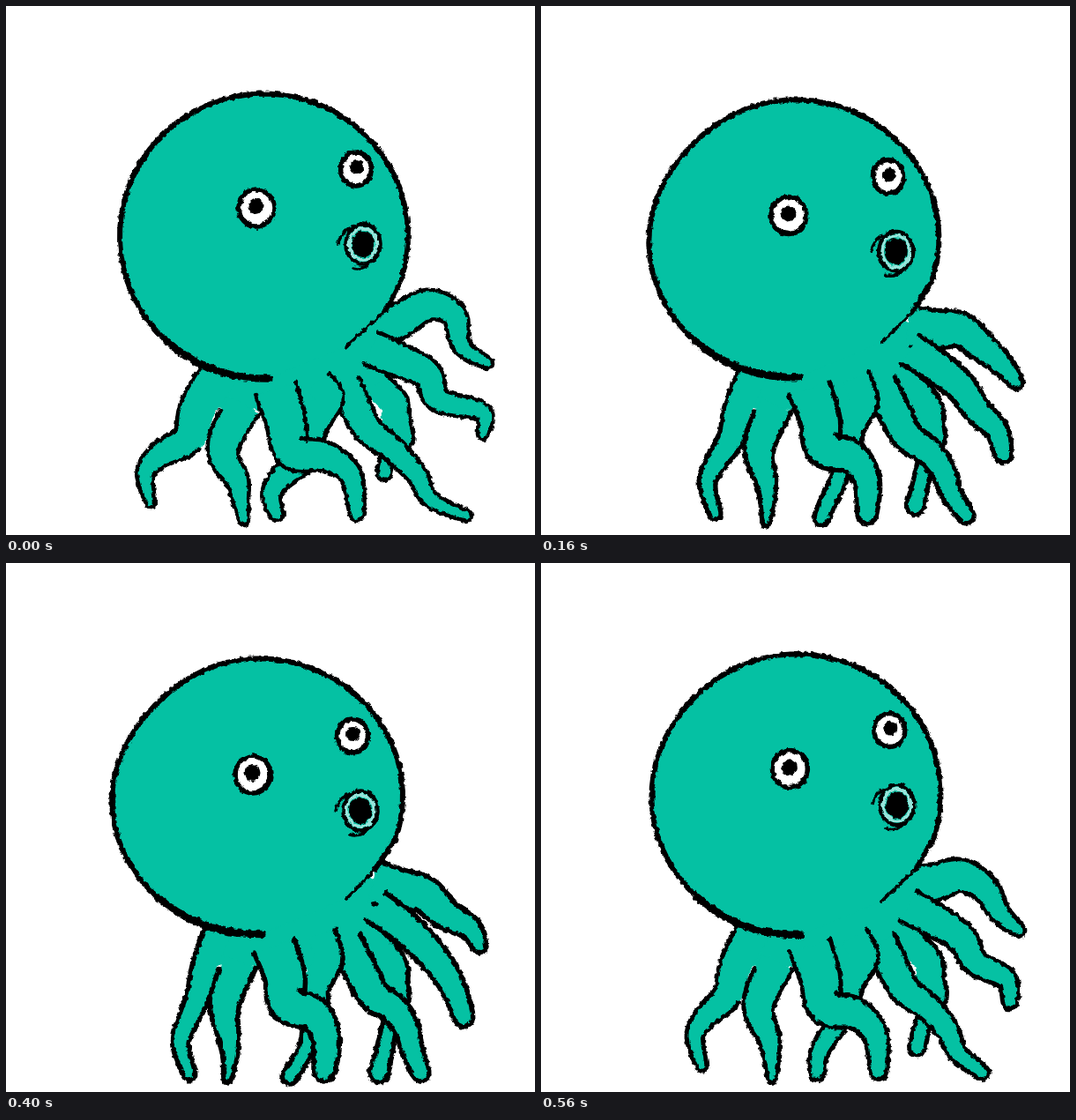
An HTML page for the animation above (640 ms loop, 600 by 600 pixels).

```html
<!DOCTYPE html>
<html lang="en">
<head>
<meta charset="utf-8">
<title>Octopus</title>
<style>
html, body { margin: 0; width: 100%; height: 100%; overflow: hidden; background: #fff; }
svg { display: block; width: 100vw; height: 100vh; }
</style>
</head>
<body>
<svg viewBox="0 0 600 600">
  <filter id="rough" filterUnits="userSpaceOnUse" x="0" y="0" width="600" height="600" color-interpolation-filters="sRGB">
    <feTurbulence id="noise" type="fractalNoise" baseFrequency=".19" numOctaves="2"/>
    <feDisplacementMap in="SourceGraphic" scale="5" xChannelSelector="R" yChannelSelector="G"/>
  </filter>
  <g id="art" filter="url(#rough)" stroke-linecap="round" stroke-linejoin="round"></g>
</svg>
<script>
const SKIN = '#05c1a3', INK = '#000', PALE = '#98e4da';
const STEP = 80, POSES = 5, CYCLE = 2 * (POSES - 1), SAMPLES = 32;

const parse = s => s.split(' ').map(p => p.split(',').map(Number));
const mix = (a, b, t) => a + (b - a) * t;
const blend = (from, to, t) => from.map((p, i) => p.map((v, k) => mix(v, to[i][k], t)));
const pair = (spread, gathered) => [parse(spread), parse(gathered)];

// An arm has a spread and a gathered key: base and tip radius, then a few points of its spine.
// bareL and bareR are the shares of each side, from the base, left without a line.
const arm = (bareL, bareR, spread, gathered) => ({ bareL, bareR, keys: pair(spread, gathered) });

// Back to front.
const arms = [
  arm(0, 0, '14,8 335,518 312,535 301,555 307,576', '8,9 345,520 342,545 333,565 322,582'),
  arm(0, 0, '9,8 436,510 431,520 429,530', '8,11 436,515 430,550 423,578'),
  arm(1, 0, '16,16 420,430 440,450 442,470 447,488', '16,16 418,430 438,455 440,475 442,492'),
  arm(.12, 0, '18,6 384,428 398,458 412,482 440,504 466,532 482,560 522,578',
    '19,10 385,430 403,464 417,490 440,506 454,528 460,550 470,578'),
  arm(1, 0, '16,16 354,426 367,444 357,462 347,480 345,495', '16,16 358,420 366,448 358,466 350,482 350,498'),
  arm(0, .4, '22,5 245,412 218,455 207,490 175,509 158,530 164,564', '15,7 242,412 226,455 218,490 206,520 198,545 208,580'),
  arm(.08, 0, '20,5 270,452 249,490 248,514 262,537 266,560 270,584', '19,4 266,452 250,490 248,512 252,535 254,560 251,586'),
  arm(0, 0, '24,8 306,434 317,470 326,506 362,511 391,532 398,576', '24,12 304,434 316,468 320,500 350,512 363,540 361,576'),
  arm(.05, 0, '21,6 418,368 446,357 478,339 508,350 517,386 546,405', '24,8 416,362 446,370 474,376 498,398 526,414 537,434'),
  arm(0, 0, '20,6 414,388 446,402 478,418 491,447 540,460 541,486', '19,11 420,390 449,411 476,437 496,462 510,488 519,515')
];
// Centre, radii, then the two points of the loose end at lower right.
const head = pair('292.5,261 163.5,161.5 385,387 432,344', '284.5,264.5 165.5,156.5 387,380 418,348');
// Left eye, right eye, mouth.
const face = pair('284,229 397,185 405,270', '280,240 393,196 402,281');
const neck = '240,400 232,455 285,458 310,470 370,455 400,455 432,425 428,365 400,350';

// Point at share s of a Catmull-Rom spline.
function along(pts, s) {
  const last = pts.length - 1, i = Math.min(last - 1, Math.floor(s * last)), u = s * last - i;
  const at = j => pts[Math.max(0, Math.min(last, j))];
  const [a, b, c, d] = [at(i - 1), at(i), at(i + 1), at(i + 2)];
  return b.map((v, k) => v + u / 2 * (c[k] - a[k]
    + u * (2 * a[k] - 5 * v + 4 * c[k] - d[k] + u * (3 * (v - c[k]) + d[k] - a[k]))));
}

const line = pts => 'M' + pts.map(p => p.map(v => v.toFixed(1))).join('L');
const path = (d, width, fill = 'none') =>
  `<path d="${d}" fill="${fill}" stroke="${width ? INK : 'none'}" stroke-width="${width}"/>`;
const oval = (x, y, rx, ry, fill, stroke = 'none', width = 0) =>
  `<ellipse cx="${x}" cy="${y}" rx="${rx}" ry="${ry}" fill="${fill}" stroke="${stroke}" stroke-width="${width}"/>`;

// Tapered ribbon around the spine with a round tip.
function drawArm({ bareL, bareR, keys }, t) {
  const [[base, tip], ...spine] = blend(...keys, t);
  const left = [], cap = [], right = [];
  for (let i = 0; i <= SAMPLES; i++) {
    const s = i / SAMPLES, r = mix(base, tip, s ** 1.5);
    const [x, y] = along(spine, s);
    const [x0, y0] = along(spine, Math.max(0, s - .01)), [x1, y1] = along(spine, Math.min(1, s + .01));
    const dir = Math.atan2(y1 - y0, x1 - x0);
    const rim = turn => [x + r * Math.cos(dir + turn), y + r * Math.sin(dir + turn)];
    left.push(rim(Math.PI / 2));
    right.unshift(rim(-Math.PI / 2));
    if (s === 1) for (let k = 1; k > -1.1; k -= .5) cap.push(rim(k));
  }
  const edge = [...left, ...cap, ...right];
  const inked = edge.slice(Math.round(bareL * SAMPLES), edge.length - Math.round(bareR * SAMPLES));
  return path(line(edge), 0, SKIN) + path(line(inked), mix(4.5, 5.5, t));
}

// Ellipse that flattens at upper left as the arms gather.
function drawHead(t) {
  const [[cx, cy], [rx, ry], end, bend] = blend(...head, t);
  const rim = [];
  for (let deg = 18; deg >= -272; deg -= 5) {
    const a = deg * Math.PI / 180;
    const k = 1 - .04 * t * Math.max(0, Math.cos(a + 2.44)) ** 6;
    rim.push([cx + k * rx * Math.cos(a), cy + k * ry * Math.sin(a)]);
  }
  return path(line([end, bend, ...rim]), 0, SKIN)
    + path(line([end, bend]), 3.5)
    + path(line([bend, ...rim]), 6)
    + path(line(rim.slice(-10)), 8.5);
}

function drawFace(t) {
  const [[lx, ly], [rx, ry], [mx, my]] = blend(...face, t);
  return oval(lx, ly, 20, 21, '#fff', INK, 5.5)
    + oval(lx - .5, ly - 2, 9, 9, INK)
    + oval(rx, ry, 17.5, 19, '#fff', INK, 5.5)
    + oval(rx + 1, ry - 2, 8, 8, INK)
    + oval(mx, my, 19.5, 22.5, SKIN, INK, 4.5)
    + oval(mx, my, 15.5, 18, SKIN, PALE, 3.5)
    + oval(mx, my, 13, 15, INK)
    + path(`M${mx - 28},${my - 1}q3,-11 12,-17M${mx - 12},${my + 27}q10,3 18,-4`, 3.5);
}

const art = document.getElementById('art'), noise = document.getElementById('noise');

function draw(pose) {
  const t = 1.08 * Math.sin(pose * Math.PI / CYCLE);
  noise.setAttribute('seed', pose + 2);
  art.innerHTML = path(line(parse(neck)), 0, SKIN)
    + arms.map(a => drawArm(a, t)).join('') + drawHead(t) + drawFace(t);
}

const start = performance.now();
let shown = -1;
function tick() {
  const step = Math.floor((performance.now() - start) / STEP) % CYCLE;
  const pose = Math.min(step, CYCLE - step);
  if (pose !== shown) draw(shown = pose);
  requestAnimationFrame(tick);
}
tick();
</script>
</body>
</html>
```
